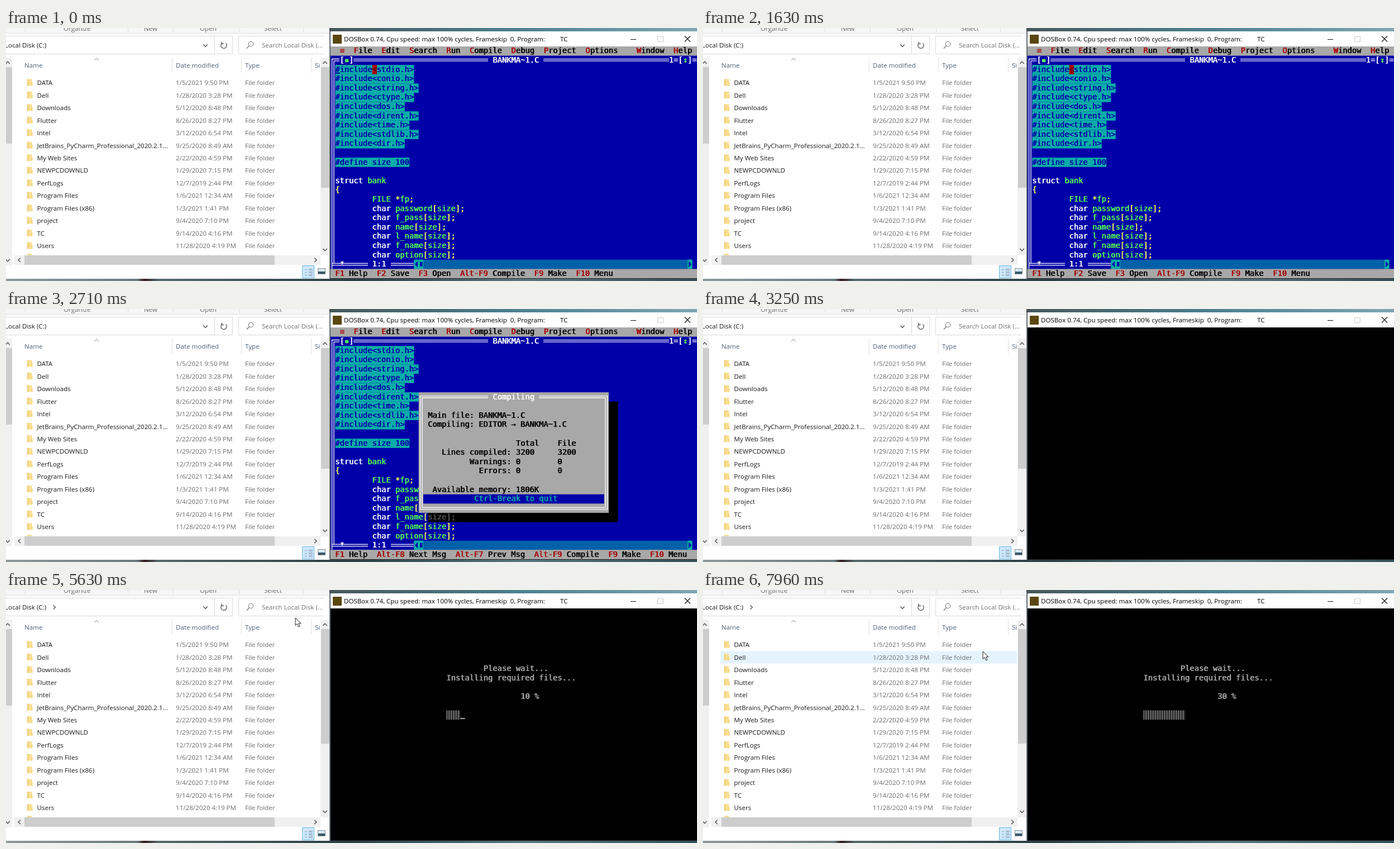
Animation, 1237 px wide and 453 px high, one loop 8000 ms. Source, as an HTML page:

```html
<!DOCTYPE html>
<html lang="en">
<head>
<meta charset="utf-8">
<title>Compile and install</title>
<style>
html, body { margin: 0; width: 100%; height: 100%; overflow: hidden; background: #fff; }
svg { display: block; width: 1237px; height: 453px; }
text { white-space: pre; }
.ui { font: 11.6px "Open Sans", "Noto Sans", sans-serif; }
.dos { font: 13.786px "DejaVu Sans Mono", monospace; }
</style>
</head>
<body>
<svg id="stage" viewBox="0 0 1237 453" xmlns="http://www.w3.org/2000/svg">
  <defs>
    <linearGradient id="sky"><stop offset="0" stop-color="#47585c"/><stop offset=".5" stop-color="#4b7f8f"/><stop offset="1" stop-color="#7fa6b5"/></linearGradient>
    <linearGradient id="shore"><stop offset="0" stop-color="#8d999b"/><stop offset=".19" stop-color="#687b80"/><stop offset=".2" stop-color="#351c1c"/><stop offset=".22" stop-color="#55696e"/><stop offset=".5" stop-color="#293f45"/><stop offset=".75" stop-color="#587780"/><stop offset="1" stop-color="#334f59"/></linearGradient>
  </defs>
</svg>
<script>
const LOOP = 8000, COL = 8.3, ROW = 16.6, LEFT = 581, TOP = 33;
const BLUE = '#0000a8', TEAL = '#06aca8', GRAY = '#a8a8a8', RED = '#a80000';
const GREEN = '#54fc54', YELLOW = '#fcfc54', WHITE = '#fff', BLACK = '#000';
const stage = document.getElementById('stage');

function add(parent, tag, attrs, text) {
  const el = document.createElementNS('http://www.w3.org/2000/svg', tag);
  for (const key in attrs) el.setAttribute(key, attrs[key]);
  if (text !== undefined) el.textContent = text;
  return parent.appendChild(el);
}
const group = parent => add(parent, 'g', {});
const rect = (g, x, y, width, height, fill, more) => add(g, 'rect', { x, y, width, height, fill, ...more });
const path = (g, d, stroke, width = 1, fill = 'none') =>
  add(g, 'path', { d, stroke, 'stroke-width': width, fill });
const label = (g, x, y, text, fill = '#1a1a1a') => add(g, 'text', { x, y, fill, class: 'ui' }, text);
const show = (el, visible) => el.setAttribute('display', visible ? 'inline' : 'none');

const colX = col => LEFT + col * COL;
const rowY = row => TOP + row * ROW;
const cells = (g, col, row, w, h, fill) => rect(g, colX(col), rowY(row), w * COL, h * ROW, fill);

// Writes coloured parts, [fill, text, fill, text, ...], on the character grid.
// Two close copies give the heavy stems and thin bars of a text-mode font.
function print(g, col, row, ...parts) {
  const pair = group(g);
  for (const shift of [-0.35, 0.35]) {
    const line = add(pair, 'text', { x: colX(col) + shift, y: rowY(row) + 12.4, class: 'dos' });
    for (let i = 0; i < parts.length; i += 2) add(line, 'tspan', { fill: parts[i] }, parts[i + 1]);
  }
  return pair;
}
const setText = (pair, text) =>
  pair.querySelectorAll('tspan').forEach(span => { span.textContent = text; });

function doubleLine(g, x1, x2, y) {
  path(g, `M${x1} ${y - 1.6}H${x2}M${x1} ${y + 1.6}H${x2}`, WHITE, 1.3);
}
const chevron = (g, x, y, dx, dy, stroke = '#555', width = 1.5) =>
  path(g, dy ? `M${x - 3.7} ${y - dy * 2}L${x} ${y + dy * 2}L${x + 3.7} ${y - dy * 2}`
             : `M${x - dx * 2} ${y - 3.7}L${x + dx * 2} ${y}L${x - dx * 2} ${y + 3.7}`, stroke, width);

// Desktop edges and file manager
rect(stage, 0, 0, 1237, 453, '#fff');
rect(stage, 579, 0, 658, 6, 'url(#sky)');
rect(stage, 0, 449, 1237, 4, 'url(#shore)');
const files = group(stage);
rect(files, 0, 0, 579, 9, '#f5f6f7');
path(files, 'M0 9.5H579', '#dcdddf');
path(files, 'M34.5 0V7M218.5 0V7M299.5 0V7M417.5 0V7M532.5 0V7', '#dddee0');
[['Organize', 103], ['New', 247], ['Open', 347], ['Select', 462]]
  .forEach(([text, x]) => label(files, x, 4.5, text, '#666'));
path(files, 'M0 14.5H405.5V46.5H0M373.5 15V46M570 14.5H416.5V46.5H570', '#d9d9d9');
label(files, -2, 35, 'Local Disk (C:)');
chevron(files, 357, 31.5, 0, 1);
path(files, 'M393.5 27.3A5.2 5.2 0 1 1 387 26.8M386 24.5V28.3H390', '#555', 1.3);
add(files, 'circle', { cx: 438.5, cy: 28.5, r: 4.2, fill: 'none', stroke: '#777', 'stroke-width': 1.1 });
path(files, 'M435.5 31.5L431 36.5', '#777', 1.2);
label(files, 458, 35, 'Search Local Disk (...', '#707070');
const crumb = chevron(files, 86.5, 31, 1, 0, '#555', 1.3);

path(files, 'M297.5 53V80M421.5 53V80M546.5 53V80', '#e2e2e2');
chevron(files, 162, 56, 0, -1, '#888', 1);
[['Name', 33], ['Date modified', 304], ['Type', 428], ['Si', 553]]
  .forEach(([text, x]) => label(files, x, 71, text, '#4c5f78'));

const hover = rect(files, 31, 87, 531, 22.4, '#e5f3ff');
const folders = `DATA|1/5/2021 9:50 PM
Dell|1/28/2020 3:28 PM
Downloads|5/12/2020 8:48 PM
Flutter|8/26/2020 8:27 PM
Intel|3/12/2020 6:54 PM
JetBrains_PyCharm_Professional_2020.2.1...|9/25/2020 8:49 AM
My Web Sites|2/22/2020 4:59 PM
NEWPCDOWNLD|1/29/2020 7:15 PM
PerfLogs|12/7/2019 2:44 PM
Program Files|1/6/2021 12:34 AM
Program Files (x86)|1/3/2021 1:41 PM
project|9/4/2020 7:10 PM
TC|9/14/2020 4:16 PM
Users|11/28/2020 4:19 PM`;
folders.split('\n').forEach((entry, i) => {
  const [name, date] = entry.split('|'), y = 98 + i * 22.46;
  rect(files, 38, y - 6.5, 8.5, 12, '#f9df92');
  rect(files, 38, y - 6.5, 2, 12, '#efca6c');
  rect(files, 45.5, y - 1, 2, 6.5, '#f6d67e');
  label(files, 55.5, y + 4.2, name);
  label(files, 304, y + 4.2, date, '#6d6d6d');
  label(files, 428, y + 4.2, 'File folder', '#6d6d6d');
});
rect(files, 38, 404.5, 8, 2, '#f5cf73');

// Scrollbars and view buttons
rect(files, 0, 53, 11, 372, '#f0f0f0');
rect(files, 0, 70, 11, 137, '#cdcdcd');
rect(files, 563, 53, 16, 354, '#f0f0f0');
const thumb = rect(files, 564, 70, 15, 216, '#cdcdcd');
rect(files, 15, 407, 548, 17, '#f0f0f0');
rect(files, 33, 407, 448, 17, '#cdcdcd');
chevron(files, 3, 62, 0, -1); chevron(files, 3, 416, 0, 1);
chevron(files, 571, 62, 0, -1); chevron(files, 571, 397, 0, 1);
chevron(files, 24, 415.5, -1, 0); chevron(files, 554, 415.5, 1, 0);
rect(files, 530.5, 425.5, 21, 22, '#cce8ff', { stroke: '#66b5dd' });
path(files, 'M535 432.5H539M535 437.5H539M535 442.5H539M542 431.5H549M542 433.5H549M542 436.5H549M542 438.5H549M542 441.5H549M542 443.5H549', '#8d9aa5');
rect(files, 558.5, 430.5, 13, 10, '#d9eaf5', { stroke: '#8a8f94' });
rect(files, 559, 436, 12, 4, '#38596a');
path(files, 'M580 0V450', '#3c4a50', 1.6);

// Emulator window
rect(stage, LEFT, 6, 656, 27, '#fff');
rect(stage, 585, 12, 16, 16, '#5a4710');
label(stage, 605, 24, 'DOSBox 0.74, Cpu speed: max 100% cycles, Frameskip  0, Program:', '#000');
label(stage, 992, 24, 'TC', '#000');
path(stage, 'M1118 20.5H1128M1215 14.5L1225 24.5M1225 14.5L1215 24.5', '#111', 1.1);
path(stage, 'M1166.5 15.5H1176.5V24.5H1166.5Z', '#c9c9c9');

// Editor
const editor = group(stage);
rect(editor, LEFT, TOP, 656, 415, BLUE);
cells(editor, 0, 0, 80, 1, GRAY);
print(editor, 2, 0, RED, '≡');
[['File', 5], ['Edit', 11], ['Search', 17], ['Run', 25], ['Compile', 30], ['Debug', 39],
 ['Project', 46], ['Options', 55], ['Window', 66], ['Help', 74]]
  .forEach(([name, col]) => print(editor, col, 0, RED, name[0], BLACK, name.slice(1)));

path(editor, 'M583.5 431V55.5H597M587 422V58.8H597', WHITE, 1.3);
print(editor, 2, 1, WHITE, '[', GREEN, '▪', WHITE, ']');
doubleLine(editor, 622, 863, 57.2);
print(editor, 35, 1, WHITE, 'BANKMA~1.C');
doubleLine(editor, 962, 1187, 57.2);
print(editor, 73, 1, WHITE, '1=[', GREEN, '↕', WHITE, ']=');
doubleLine(editor, 584, 648, 423);
print(editor, 2, 23, WHITE, '*');
print(editor, 9, 23, WHITE, '1:1');
doubleLine(editor, 689, 730, 423);
cells(editor, 18, 23, 60, 1, '#0060a8');
cells(editor, 18, 23, 2, 1, TEAL);
cells(editor, 77, 23, 1, 1, TEAL);
path(editor, 'M737 417.5V428.5L732 423ZM1222 417.5V428.5L1227 423Z', 'none', 0, BLUE);
rect(editor, 741, 419, 4.5, 8, BLUE);

const selected = 'stdio conio string ctype dos dirent time stdlib dir'.split(' ').map(h => `#include<${h}.h>`);
selected.push('', '#define size 100');
selected.forEach((text, i) => {
  cells(editor, 1, 2 + i, text.length, 1, TEAL);
  print(editor, 1, 2 + i, BLUE, text);
});
const colourOf = token => /^(struct|char)$/.test(token) ? WHITE : /^\w/.test(token) ? GREEN : YELLOW;
const fields = ['password', 'f_pass', 'name', 'l_name', 'f_name', 'option'].map(name => `char ${name}[size];`);
['struct bank', '{', 'FILE *fp;', ...fields].forEach((text, i) =>
  print(editor, i < 2 ? 1 : 9, 14 + i, ...text.match(/\w+|\W+/g).flatMap(token => [colourOf(token), token])));

const blockPointer = group(editor);
cells(blockPointer, 9, 2, 1, 1, RED);
print(blockPointer, 9, 2, '#540000', '<');

function hotkeys(text) {
  const g = group(editor);
  cells(g, 0, 24, 80, 1, GRAY);
  print(g, 1, 24, ...text.split(/((?:Alt-)?F\d+)/).flatMap((part, i) => [i % 2 ? RED : BLACK, part]));
  return g;
}
hotkeys('F1 Help  F2 Save  F3 Open  Alt-F9 Compile  F9 Make  F10 Menu');
const compileKeys = hotkeys('F1 Help  Alt-F8 Next Msg  Alt-F7 Prev Msg  Alt-F9 Compile  F9 Make  F10 Menu');

// Compile dialog
const dialog = group(editor);
cells(dialog, 21, 8, 41, 13, BLACK);
print(dialog, 21, 20, '#545454', 'size];');
cells(dialog, 19, 7, 41, 13, GRAY);
path(dialog, 'M863 155.8H741.5V358.6H1076.5V155.8H954M863 159H745V355.4H1073V159H954', WHITE, 1.3);
print(dialog, 35, 7, WHITE, 'Compiling');
[[21, 9, 'Main file: BANKMA~1.C'], [21, 10, 'Compiling: EDITOR → BANKMA~1.C'],
 [40, 12, 'Total    File'], [24, 13, 'Lines compiled:'], [30, 14, 'Warnings: 0        0'],
 [32, 15, 'Errors: 0        0'], [22, 17, 'Available memory: 1806K']]
  .forEach(([col, row, text]) => print(dialog, col, row, BLACK, text));
const lineCount = print(dialog, 40, 13, BLACK, '');
cells(dialog, 20, 18, 39, 1, BLUE);
print(dialog, 31, 18, TEAL, 'Ctrl-Break to quit');

// Program output
const output = group(stage);
rect(output, LEFT, TOP, 656, 415, BLACK);
const message = group(output);
print(message, 33, 6, GRAY, 'Please wait...');
print(message, 25, 7, GRAY, 'Installing required files...');
const percentText = print(output, 41, 9, GRAY, '');
const bar = group(output);
const barBack = cells(bar, 25, 11, 0, 1, '#2c2c2c');
const barStripes = add(bar, 'path', { stroke: '#8c8c8c', 'stroke-width': ROW, 'stroke-dasharray': '1.2 2.95' });
rect(stage, LEFT, 448, 656, 1, '#222');

const caret = rect(stage, 0, 0, COL, 2, GRAY);
const arrow = path(stage, 'M0 0V13.5L3.2 10.6L5.6 16L8 15L5.7 9.8H10Z', '#222', 1, '#fff');

const DIALOG_AT = 2400, RUN_AT = 3050, MESSAGE_AT = 3700, CRUMB_AT = 4800, ARROW_AT = 5300;
// Each step prints the percentage, then, a little later, its part of the bar.
const PERCENT_AT = 4275, STEP = 1165, BAR_DELAY = 180, BLINK = 457;
const arrowKeys = [[5300, 530, 12], [5600, 518, 50], [5950, 518, 50], [6350, 506, 91],
  [7500, 504, 95], [7750, 501, 110], [8000, 501, 110]];

function arrowAt(t) {
  const i = Math.max(1, arrowKeys.findIndex(key => key[0] >= t));
  const [t0, x0, y0] = arrowKeys[i - 1], [t1, x1, y1] = arrowKeys[i];
  const p = Math.min(1, Math.max(0, (t - t0) / (t1 - t0))), ease = p * p * (3 - 2 * p);
  return [x0 + (x1 - x0) * ease, y0 + (y1 - y0) * ease];
}

function draw(t) {
  const running = t >= RUN_AT, compiling = t >= DIALOG_AT && !running;
  show(editor, !running);
  show(output, running);
  show(message, t >= MESSAGE_AT);
  show(dialog, compiling);
  show(compileKeys, compiling);
  show(blockPointer, !compiling);
  thumb.setAttribute('height', t >= MESSAGE_AT ? 205 : 216);
  show(crumb, t >= CRUMB_AT);

  const lines = Math.max(0, Math.min(3200, Math.floor((t - DIALOG_AT) / 300 * 32) * 100));
  setText(lineCount, String(lines).padEnd(9) + lines);

  const step = Math.floor((t - PERCENT_AT) / STEP);
  const barStep = Math.max(0, Math.floor((t - PERCENT_AT - BAR_DELAY) / STEP));
  const percent = `${step * 10} %`, barEnd = 25 + barStep * 3;
  setText(percentText, step < 0 ? '' : percent);
  barBack.setAttribute('width', barStep * 3 * COL);
  barStripes.setAttribute('d', `M${colX(25)} ${rowY(11.5)}H${colX(barEnd)}`);
  show(bar, barStep > 0);

  const [col, row] = !running ? [1, 2] : step > barStep || step === 0 ? [41 + percent.length, 9] : [barEnd, 11];
  caret.setAttribute('x', colX(col));
  caret.setAttribute('y', rowY(row) + 13.5);
  caret.setAttribute('fill', running ? GRAY : BLUE);
  show(caret, (t < DIALOG_AT || step >= 0) && (t + 70) % BLINK < BLINK / 2);

  const [x, y] = arrowAt(t), pointing = t >= ARROW_AT;
  arrow.setAttribute('transform', `translate(${x} ${y})`);
  show(arrow, pointing);
  show(hover, pointing && y >= 87);
  hover.setAttribute('y', y >= 109 ? 109.3 : 87);
}

const start = performance.now();
function tick() {
  draw((performance.now() - start) % LOOP);
  requestAnimationFrame(tick);
}
tick();
</script>
</body>
</html>
```
